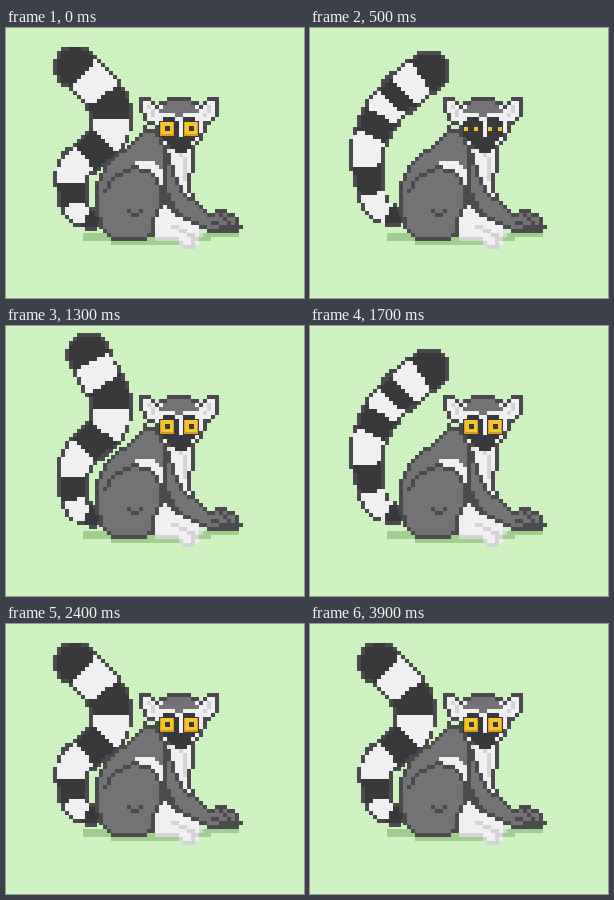
Write an HTML page with a canvas that moves like this. It is 298 px wide and 270 px high and loops after 5100 ms.

```html
<!DOCTYPE html>
<html lang="en">
<head>
<meta charset="utf-8">
<title>Lemur</title>
<style>
html, body { margin: 0; width: 100%; height: 100%; overflow: hidden; background: #cff3c0; }
canvas { display: block; image-rendering: pixelated; }
</style>
</head>
<body>
<canvas id="stage" width="298" height="270"></canvas>
<script>
const CELL = 4, LOOP = 5100;
const SKY = '#cff3c0', SHADE = '#9fce8e', LINE = '#4b4b4d', BLACK = '#39393b',
      GRAY = '#737375', WHITE = '#f0f0f2', PALE = '#d4d4d7', GOLD = '#f5c52c', AMBER = '#d99a22';
const ctx = document.getElementById('stage').getContext('2d');
const body = document.createElement('canvas');
body.width = 298; body.height = 270;
const pen = body.getContext('2d');

function rect(c, color, x, y, w, h) {
  c.fillStyle = color;
  c.fillRect(x, y, w, h);
}

const snap = v => Math.floor((v - 1) / CELL) * CELL + 1;
const pairs = list => list.reduce((out, v, i) => (i % 2 ? out[out.length - 1].push(v) : out.push([v]), out), []);

// Pixel-grid polyline
function line(color, list) {
  const pts = pairs(list);
  for (let i = 1; i < pts.length; i++) {
    const [x0, y0] = pts[i - 1].map(snap), [x1, y1] = pts[i].map(snap);
    const steps = Math.max(Math.abs(x1 - x0), Math.abs(y1 - y0)) / CELL || 1;
    for (let s = 0; s <= steps; s++)
      rect(pen, color, snap(x0 + (x1 - x0) * s / steps + 2), snap(y0 + (y1 - y0) * s / steps + 2), CELL, CELL);
  }
}

// Pixel-grid polygon with an optional outline
function shape(color, list, outline) {
  const path = new Path2D();
  pairs(list).forEach(([x, y]) => path.lineTo(x, y));
  for (let y = 1; y < 270; y += CELL)
    for (let x = 1; x < 298; x += CELL)
      if (pen.isPointInPath(path, x + 2, y + 2)) rect(pen, color, x, y, CELL, CELL);
  if (outline) line(outline, [...list, list[0], list[1]]);
}

function paintBody() {
  shape(SHADE, [78,205, 236,203, 232,209, 204,211, 190,217, 150,218, 128,215, 104,215, 90,213, 79,211]);

  // Torso and chest
  shape(GRAY, [140,99, 134,108, 122,118, 110,127, 102,136, 95,145, 91,155, 91,184, 95,197, 104,205,
    112,211, 136,211, 146,205, 156,190, 166,172, 165,140, 160,122, 149,106], LINE);
  shape(WHITE, [164,122, 185,122, 186,138, 184,152, 187,172, 178,166, 170,152, 164,138]);
  line(LINE, [186,124, 186,138, 183,146, 183,158, 187,170]);
  line(PALE, [174,124, 178,138, 178,150]);

  // Arm and hand
  shape(GRAY, [160,128, 165,142, 171,154, 179,166, 189,176, 197,183, 205,185, 210,181, 219,182, 225,188,
    234,197, 230,202, 208,204, 196,198, 180,190, 168,178, 160,162], LINE);
  line(LINE, [208,193, 218,197, 230,200]);
  line(LINE, [214,188, 224,194]);

  // Thigh, hind leg and foot
  shape(WHITE, [128,134, 146,134, 155,142, 159,158, 161,176, 169,185, 182,191, 193,199, 195,207,
    191,217, 183,221, 178,217, 172,211, 152,209, 146,204, 150,192, 154,178, 153,154, 146,143, 132,139]);
  line(LINE, [157,146, 159,160, 160,176, 168,184, 180,190, 192,196]);
  line(PALE, [152,209, 172,211, 180,219, 188,220, 188,212, 194,207]);
  line(PALE, [166,198, 178,203, 188,206]);
  line(LINE, [98,162, 102,154, 110,147, 118,141, 128,137, 142,141, 150,150, 153,164, 153,178, 148,192, 147,206]);
  line(LINE, [122,184, 128,186, 134,184]);

  // Head
  shape(WHITE, [133,70, 142,70, 150,78, 153,92, 147,96, 139,91, 134,82], LINE);
  shape(WHITE, [210,70, 201,70, 194,78, 191,92, 198,96, 205,91, 210,82], LINE);
  line(PALE, [142,78, 146,86]);
  line(PALE, [202,78, 198,86]);
  shape(WHITE, [150,82, 162,73, 183,73, 195,82, 197,104, 190,116, 182,122, 166,122, 156,116, 149,104]);
  line(LINE, [149,98, 150,108, 156,114, 164,120]);
  line(LINE, [197,98, 195,108, 190,114, 184,120]);
  shape(GRAY, [154,84, 162,73, 184,73, 194,84, 182,84, 174,90, 166,84]);
  line(LINE, [152,80, 162,72, 184,72, 194,80]);
  shape(BLACK, [153,92, 168,89, 171,94, 171,108, 165,113, 153,109]);
  shape(BLACK, [194,92, 179,89, 176,94, 176,108, 182,113, 194,109]);
  shape(BLACK, [168,108, 180,108, 186,115, 182,122, 174,125, 166,122, 162,115]);
}

function paintEyes(lid) {
  for (const x of [153, 177]) {
    rect(ctx, BLACK, x, 93, 16, 16);
    if (lid === 0) {
      rect(ctx, AMBER, x + 1, 94, 14, 14);
      rect(ctx, GOLD, x + 2, 94, 12, 12);
      rect(ctx, BLACK, x + 6, 98, 5, 5);
    } else if (lid === 1) {
      rect(ctx, GOLD, x + 1, 99, 4, 4);
      rect(ctx, GOLD, x + 11, 99, 4, 4);
    }
  }
}

// Ring centres from the tip to the base of the tail
const curled = pairs([69,39, 90,58, 104,79, 104,104, 89,122, 68,140, 66,165, 71,183, 86,192]);
const raised = pairs([82,28, 92,48, 104,71, 103,97, 88,115, 70,136, 67,162, 72,182, 86,191]);
const leaning = pairs([105,43, 106,59, 98,78, 85,95, 72,112, 59,133, 57,157, 66,180, 85,189]);
const swung = pairs([118,44, 100,57, 87,69, 76,81, 66,98, 57,122, 59,151, 66,177, 85,189]);

const mix = (a, b, k, bow = 0) => a.map(([x, y], i) =>
  [x + (b[i][0] - x) * k - bow * Math.sin(Math.PI * i / 8), y + (b[i][1] - y) * k]);

const forward = [mix(raised, swung, .35, 4), mix(raised, swung, .7, 5), swung, mix(leaning, swung, 1.04)];
const back = [mix(leaning, swung, .5), leaning, mix(leaning, raised, .5), raised, curled];
const run = (start, poses) => poses.map((pose, i) => [start + i * 100, pose]);
const tailTimes = [[0, curled], [100, raised], ...run(300, forward), ...run(700, back),
  [1300, raised], ...run(1500, forward), ...run(2000, back)];
const blink = start => [[start, 1], [start + 100, 2], [start + 200, 1], [start + 300, 0]];
const lidTimes = [[0, 0], ...blink(500), ...blink(3600)];
const valueAt = (keys, t) => keys.filter(([start]) => start <= t).pop()[1];

function spline(p, t) {
  const i = Math.min(Math.floor(t), p.length - 2), u = t - i;
  const a = p[Math.max(i - 1, 0)], b = p[i], c = p[i + 1], d = p[Math.min(i + 2, p.length - 1)];
  return [0, 1].map(n => b[n] + u / 2 * (c[n] - a[n] +
    u * (2 * a[n] - 5 * b[n] + 4 * c[n] - d[n] + u * (3 * (b[n] - c[n]) + d[n] - a[n]))));
}

function paintTail(pose) {
  const samples = [];
  for (let t = 0; t <= 8; t += .1) samples.push([t, ...spline(pose, t)]);
  for (let y = 7; y < 202; y += CELL)
    for (let x = 35; x < 139; x += CELL) {
      let depth = -1, ring = 0, nearest = Infinity;
      for (const [t, sx, sy] of samples) {
        const dist = Math.hypot(x + 2 - sx, y + 2 - sy);
        if (dist < nearest) {
          nearest = dist;
          ring = Math.round(t);
          depth = 22 - .17 * t * t - dist;
        }
      }
      if (depth > 0) rect(ctx, depth < 3.2 ? LINE : ring % 2 ? WHITE : BLACK, x, y, CELL, CELL);
    }
}

let shownPose, shownLid;
function frame(now) {
  const t = now % LOOP, pose = valueAt(tailTimes, t), lid = valueAt(lidTimes, t);
  if (pose !== shownPose || lid !== shownLid) {
    rect(ctx, SKY, 0, 0, 298, 270);
    paintTail(pose);
    ctx.drawImage(body, 0, 0);
    paintEyes(lid);
    shownPose = pose;
    shownLid = lid;
  }
  requestAnimationFrame(frame);
}

paintBody();
const begin = performance.now();
const tick = () => frame(Math.max(0, performance.now() - begin));
frame = (draw => () => draw(Math.max(0, performance.now() - begin)))(frame);
tick();
</script>
</body>
</html>
```
